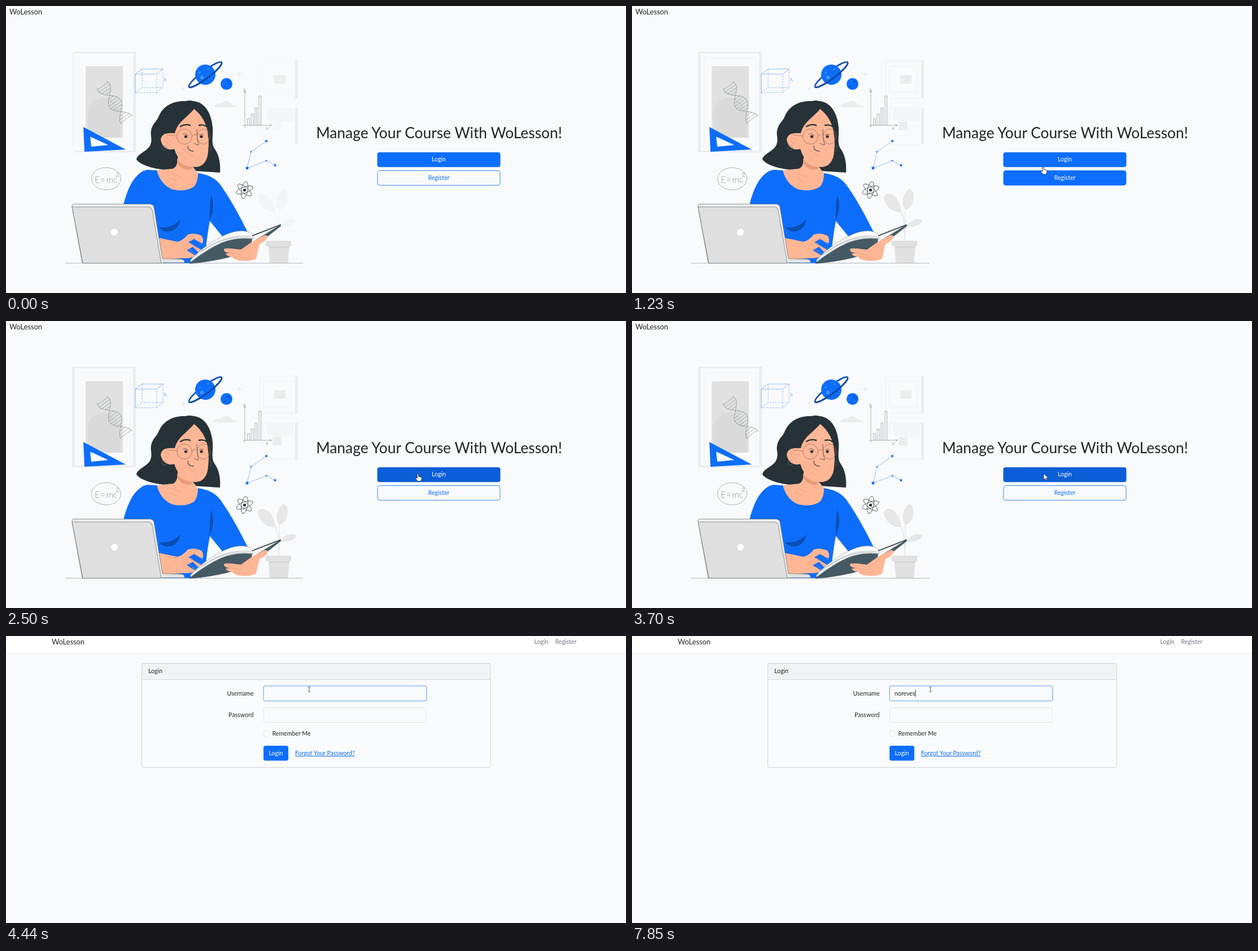
Animation, 1098 px wide and 510 px high, one loop 8000 ms. Source, as an HTML page:

```html
<!DOCTYPE html>
<html lang="en">
<head>
<meta charset="utf-8">
<title>WoLesson</title>
<style>
html, body { margin: 0; width: 100%; height: 100%; overflow: hidden; background: #f9fafc; }
svg { display: block; width: 100vw; height: 100vh; }
text { font: 10.6px Lato, sans-serif; fill: #212529; white-space: pre; }
.brand { font-size: 12.8px; }
.title { font-size: 26.35px; }
.mid { text-anchor: middle; }
.end { text-anchor: end; }
.white { fill: #fff; }
.nav { fill: #6f747a; }
.blue { fill: #0d6efd; }
.shade { fill: #0b4fb4; }
.skin { fill: #ffb695; }
.hair { fill: #263238; }
.grey { fill: #e1e1e1; }
.pale { fill: #eceded; }
.line { fill: none; stroke: #3c484e; stroke-width: .8; stroke-linecap: round; stroke-linejoin: round; }
.thin { stroke-width: .6; stroke: #7a8388; }
.rim { stroke-width: .7; stroke: #96685a; }
.sketch { fill: none; stroke: #6aa3f8; stroke-width: .7; }
.fold { fill: none; stroke: #e39a7c; stroke-width: .7; stroke-linecap: round; }
</style>
</head>
<body>
<svg viewBox="0 0 1098 510">
  <rect width="1098" height="510" fill="#f9fafc"/>

  <g id="home">
    <text class="brand" x="6" y="14.6">WoLesson</text>

    <!-- wall pictures -->
    <path class="pale" d="M121 81H230V84H121zM225 84H230V260H225zM122 257H225V260H122z"/>
    <path class="grey" d="M141 107H207V234H141z"/>
    <path fill="#dadada" d="M145 234V185Q150 164 176 163Q202 168 203 204V234z"/>
    <g class="late">
      <path class="pale" d="M117 81H122V260H117z"/>
      <path d="M128 92H220V249H128z" fill="none" stroke="#efefef"/>
      <path d="M450 98H512V164H450zM456 107H505V153H456zM455 181H512V246H455z" fill="none" stroke="#f1f1f1"/>
      <path class="pale" d="M472 206H488V221H472z"/>
    </g>
    <path class="pale" d="M512 97H517V164H512zM512 181H517V246H512zM475 123H495V138H475z"/>
    <path fill="#f4f5f6" d="M463 181H510V205H463z"/>
    <path class="pale" d="M368 178Q373 172 381 173Q387 166 396 171Q400 176 410 178Q411 180 390 180Q370 181 368 178z"/>
    <g id="sparkles" class="pale"></g>
    <path id="helix" class="line thin"/>

    <path class="blue" fill-rule="evenodd" d="M137 215L212 255L139 259zM149 232L151 250L181 247z"/>
    <path class="sketch" d="M229 154V121H267L278 112H241L229 121"/>
    <path class="sketch" stroke-dasharray="3 2" d="M229 154H267V121M241 112V145H278V112M229 154L241 145M267 154L278 145"/>
    <path class="sketch" d="M281 127V134M281 131Q284 128 284 134"/>

    <!-- planets -->
    <g transform="rotate(-37 353 122)">
      <ellipse cx="353" cy="122" rx="36" ry="7" fill="none" stroke="#0b4fb4" stroke-width="2.6"/>
      <circle class="blue" cx="353" cy="122" r="18"/>
      <path d="M317 122A36 7 0 0 0 389 122" fill="none" stroke="#0a479f" stroke-width="2.8"/>
    </g>
    <g fill="#4b93ff"><circle cx="347" cy="127" r="3.2"/><circle cx="343" cy="118" r="1.6"/><circle cx="358" cy="112" r="1.5"/></g>
    <circle class="blue" cx="390.5" cy="138.5" r="10.5"/>
    <g class="shade"><circle cx="394" cy="134" r="2"/><circle cx="397" cy="138" r="1.2"/><circle cx="387" cy="143" r="1.3"/></g>

    <!-- chart -->
    <path class="line thin" d="M423 216V151M421 154L423 150L425 154M420 212H470M467 210L470 212L467 214M420 147L422 149M424 147L421 151M461 216L464 220M464 216L461 220"/>
    <path class="line thin" d="M427.5 212V200H431V212M434 212V192H438V212M441 212V181H444.5V212M448 212V160H451.5V212"/>

    <!-- constellation -->
    <path class="sketch" d="M461 240L434 259L427 288L461 275L476.5 283"/>
    <g id="stars" class="blue"></g>

    <!-- atom -->
    <g id="atom" class="line"></g>
    <circle class="hair" cx="422.5" cy="327" r="2.6"/>

    <ellipse class="line thin" cx="177.5" cy="307" rx="26" ry="19.8"/>
    <path class="line thin" d="M165 303H159V314H165.5M159 308.5H164M168.5 307H174M168.5 310.5H174M179 314V307M179 309Q182 304 183.5 308V314M183.5 309Q187 304 188.5 308V314M195 307Q191 305 191 310Q191 315 196 313M195 298Q198 294 199 298Q199 300 195 303H200"/>

    <!-- plant -->
    <path class="grey" d="M460 417H505V427H502L499 457H467L465 427H460z"/>
    <path fill="#d6d6d6" d="M465 427H502L501.500 430H465.500z"/>
    <g class="late">
      <path fill="#e7e7e7" d="M477 366C465 369 448 357 446 341C447 330 462 332 469 343Q476 353 477 366zM484 362C475 350 481 333 490 325C500 325 501 342 496 352Q492 360 484 362zM485 391Q500 374 513 380Q516 386 502 391Q493 394 485 391z"/>
      <path d="M477 366Q484 380 483 417M484 362V400M485 391L483 410" fill="none" stroke="#dedede"/>
    </g>

    <!-- hair behind, shirt, neck -->
    <path class="hair" d="M318 169C297 168 279 177 271 195C266 207 262 206 258 217C254 230 260 234 256 246C252 258 231 263 231 273C241 286 276 293 302 291L379 296C380 281 378 265 369 253C363 244 367 232 366 216C364 193 354 171 332 169Q325 167 318 169z"/>
    <path class="blue" d="M250 291C231 297 219 312 208 353H258L278 457H338L354 430Q357 403 361 382L386 413L390 417L428 402Q405 355 384 324C374 308 362 300 339 297z"/>
    <path class="skin" d="M303 255Q307 284 296 289L267 292Q274 318 295 326Q318 331 333 321Q340 313 340 297L327 281z"/>
    <path fill="#e79b7b" d="M303 271Q310 284 330 286Q330 292 321 291Q308 289 303 277z"/>
    <path class="shade" d="M363 336Q369 347 366 365L361 382Q360 360 363 336zM271 393Q293 396 309 379Q306 395 293 400Q280 404 271 393z"/>
    <path d="M245 292Q236 297 232 306" fill="none" stroke="#0b4fb4" stroke-width=".7"/>

    <!-- face -->
    <path class="skin" d="M333 183C325 194 304 205 299 226C290 224 275 225 274 238C276 250 286 258 298 254Q303 272 317 280Q331 290 345 284Q357 277 358 258C360 238 361 205 333 183z"/>
    <path class="hair" d="M334 179C323 199 301 207 297 226Q290 225 282 227Q274 204 294 185Q312 170 334 179zM332 180C348 191 357 201 358 232L365 242V212C361 192 353 178 332 180z"/>
    <path class="fold" d="M279 235Q286 231 292 241M280 239Q285 243 291 246M304 260L322 273M313 254L335 270M295 298L309 304M291 305L302 311"/>
    <path d="M309 214Q317 209 326 212M342 212Q349 210 355 214" fill="none" stroke="#263238" stroke-width="2.4" stroke-linecap="round"/>
    <path class="line" d="M338 219Q338 235 341 247Q337 247 333 244"/>
    <path class="line" d="M322 249Q322 258 332 258" style="stroke-width:1.3"/>
    <g class="line rim"><circle cx="316" cy="232" r="13.5"/><ellipse cx="350" cy="232" rx="11.5" ry="13.5"/><path d="M329 231Q334 226 339 231M302 231L285 229"/></g>
    <circle class="hair" cx="318.5" cy="232" r="2.6"/><circle class="hair" cx="346" cy="232" r="2.6"/>
    <path class="line" d="M313 228Q319 225 323 230M342 229Q346 226 350 229"/>
    <g class="line thin"><circle cx="280.5" cy="252" r="4.2"/><path d="M360 248Q367 252 361 258"/></g>

    <!-- forearm -->
    <path class="skin" d="M270 412L304 419Q313 417 322 406Q333 402 346 408Q351 414 348 422L340 418Q348 427 348 435L340 442Q332 449 314 448L276 451z"/>
    <path class="blue" d="M323 420L333 414L348 423L347 434zM320 434L331 428L343 440L338 445z"/>
    <path class="fold" d="M320 419L334 412L347 424M312 428L327 421L345 437M311 435L322 430L338 443"/>

    <!-- book -->
    <path fill="#455a64" d="M324 457L381 417L437 407L486 388L487 391L436 431Q400 451 326 458z"/>
    <path d="M327 451Q350 427 376 413Q408 394 431 402Q438 406 437 414Q408 410 381 421Q353 434 327 455z" fill="#fcfcfc"/>
    <path d="M437 408L484 390L435 420z" fill="#f6f6f6"/>
    <path class="line thin" d="M327 451Q350 427 376 413Q408 394 431 402Q438 406 437 414Q408 410 381 421Q353 434 327 455M337 443Q387 402 434 410M347 436Q390 405 436 413"/>
    <path class="line" d="M437 408L486 389" style="stroke-width:1.7"/>
    <path class="skin" d="M463 408Q464 416 449 423Q446 434 443 449Q431 455 411 452Q399 448 402 446Q390 445 389 440L396 439Q383 437 387 431Q397 430 407 432L416 433L434 420L458 407z"/>
    <path class="fold" d="M395 438L415 442M403 446L421 447M418 437Q427 434 434 422"/>

    <!-- laptop and desk -->
    <path class="line thin" d="M105 457H526"/>
    <path d="M119 352H256Q261 353 262 357L277 449L311 450Q317 451 316 456H135L117 357Q116 353 119 352z" fill="#f0f0f0" stroke="#59656b" stroke-width=".7"/>
    <path d="M117 357H254Q258 358 259 363L275 457H136z" fill="#dfdfdf" stroke="#465258" stroke-width=".6"/>
    <path class="grey" d="M277 451L312 451Q317 453 315 456H278z"/>
    <circle cx="192" cy="402" r="6" class="white"/>

    <text class="title mid" x="767" y="234.7">Manage Your Course With WoLesson!</text>
    <rect id="loginButton" x="657.5" y="260" width="218" height="26.3" rx="4"/>
    <text class="white mid" x="766.5" y="276.3">Login</text>
    <rect id="registerButton" x="658" y="292.5" width="217" height="26" rx="4" fill="#0d6efd" stroke="#0d6efd" stroke-width=".8"/>
    <text id="registerText" class="mid" x="766.5" y="308.6">Register</text>
  </g>

  <g id="login">
    <rect y="30" width="1098" height="2" fill="#eef0f2"/>
    <rect width="1098" height="30.3" fill="#fff"/>
    <text class="brand" x="81" y="14.6">WoLesson</text>
    <text class="nav" x="935.5" y="14.2">Login</text>
    <text class="nav" x="972.5" y="14.2">Register</text>
    <rect x="240.5" y="48.5" width="617.5" height="185" rx="3" fill="#fafbfd"/>
    <path d="M240.5 77V51Q241 48.5 243 48.5H855Q858 49 858 51V77z" fill="#f2f3f5"/>
    <path d="M240.5 77.5H858" stroke="#d5d8dc"/>
    <rect x="240.5" y="48.5" width="617.5" height="185" rx="3" fill="none" stroke="#cfd3d8"/>
    <text x="252" y="66.2">Login</text>
    <text class="end" x="438.5" y="105.6">Username</text>
    <text class="end" x="438.5" y="144.3">Password</text>
    <rect x="455" y="87.5" width="291" height="29" rx="4" fill="#c0d9fd"/>
    <rect x="456.5" y="89" width="288" height="26" rx="2.5" fill="#fafbfd" stroke="#8ab8fb"/>
    <rect x="456.5" y="127.5" width="287.5" height="26" rx="3" fill="#fafbfd" stroke="#e3e6eb"/>
    <rect x="456.5" y="169" width="9" height="9.5" rx="2" fill="#fbfcfd" stroke="#e6e9ed"/>
    <text x="471.5" y="177.3">Remember Me</text>
    <rect class="blue" x="456" y="195" width="44" height="26.5" rx="3.5"/>
    <text class="white mid" x="478" y="212">Login</text>
    <text class="blue" x="512" y="212" text-decoration="underline">Forgot Your Password?</text>
    <text id="typed" x="465" y="105.5"></text>
    <path id="caret" d="M.5 95.5V108.5" stroke="#212529" stroke-width=".9"/>
  </g>

  <g id="arrow"><path d="M0 0V11L2.6 8.6L4.3 12.3L6 11.5L4.4 8H8z" fill="#fff" stroke="#222" stroke-width=".7"/></g>
  <g id="hand"><path d="M-1.2 1Q0-.8 1.2 1V5Q2.5 4 3.3 5.3Q4.6 4.6 5.3 5.8Q7 5.4 7 7.2Q7 10.5 5.3 13H-.8Q-2 10.5-4 8.3Q-4.3 6.3-2.4 7L-1.2 8.3z" fill="#fff" stroke="#222" stroke-width=".8"/></g>
  <g id="beam"><path d="M-2-4.5Q0-4.5 0-3.5Q0-4.5 2-4.5M0-4V4M-2 4.5Q0 4.5 0 3.5Q0 4.5 2 4.5" fill="none" stroke="#333" stroke-width=".8"/></g>
</svg>

<script>
const LOOP = 8000, PAGE_CHANGE = 3770;
const $ = id => document.getElementById(id);
const clamp = v => Math.max(0, Math.min(1, v));
const ramp = (t, start, length = 150) => {
  const p = clamp((t - start) / length);
  return p * p * (3 - 2 * p);
};
const mix = (a, b, p) => `rgb(${a.map((v, i) => v + (b[i] - v) * p)})`;
const show = (el, on) => { el.style.display = on ? '' : 'none'; };

const starPath = (x, y, outer, inner, points) => {
  const corners = Array.from({ length: points * 2 }, (_, i) => {
    const r = i % 2 ? inner : outer, a = Math.PI * (i / points - .5);
    return (x + r * Math.cos(a)).toFixed(2) + ' ' + (y + r * Math.sin(a)).toFixed(2);
  });
  return `<path d="M${corners.join('L')}z"/>`;
};
$('stars').innerHTML = [[461, 240, 3], [434, 259, 2], [427, 288, 3.8], [461, 275, 2], [476.5, 283, 3]]
  .map(([x, y, r]) => starPath(x, y, r, r * .5, 5)).join('');
$('sparkles').innerHTML = [[413, 121, 6], [314, 147, 5], [362, 89, 2], [401, 121, 2]]
  .map(([x, y, r]) => starPath(x, y, r, r * .28, 4)).join('');
$('atom').innerHTML = [-20, 40, 100]
  .map(a => `<ellipse cx="422.5" cy="327" rx="15.5" ry="5.5" transform="rotate(${a} 422.5 327)"/>`).join('');

// two strands winding round a slanted axis, joined by rungs
const strand = (s, side) => {
  const offset = side * 12 * Math.cos(Math.PI * (2.2 * s - .16));
  return `${170 + 44 * s + offset * .81} ${140 + 63 * s - offset * .585}`;
};
const steps = Array.from({ length: 31 }, (_, i) => i / 30);
$('helix').setAttribute('d',
  [1, -1].map(side => 'M' + steps.map(s => strand(s, side)).join('L')).join('') +
  steps.filter((_, i) => i % 2).map(s => `M${strand(s, 1)}L${strand(s, -1)}`).join(''));

// time, x, y of the pointer tip
const pointer = [
  [480, 977, 486], [560, 912, 463], [690, 788, 422], [760, 767, 387], [910, 726, 318],
  [950, 723.5, 303], [1230, 728, 286], [1420, 729.5, 272], [4040, 729, 271],
  [4440, 537, 95], [4720, 537, 95], [4780, 528.5, 95]
];
function pointerAt(t) {
  const next = pointer.findIndex(k => k[0] > t);
  if (next < 0) return pointer.at(-1).slice(1);
  if (!next) return pointer[0].slice(1);
  const a = pointer[next - 1], b = pointer[next], p = (t - a[0]) / (b[0] - a[0]);
  return [a[1] + (b[1] - a[1]) * p, a[2] + (b[2] - a[2]) * p];
}

const userName = 'noreves';
const keyTimes = [6130, 6330, 7060, 7260, 7390, 7720, 7850];
const caretResets = [4780, ...keyTimes];
const late = document.querySelectorAll('.late');

function draw(t) {
  const onLogin = t >= PAGE_CHANGE;
  show($('home'), !onLogin);
  show($('login'), onLogin);

  late.forEach(g => { g.style.opacity = .3 + .7 * ramp(t, 480, 450); });
  const hover = ramp(t, 921) * (1 - ramp(t, 1230));
  $('registerButton').style.fillOpacity = hover;
  $('registerText').style.fill = mix([13, 110, 253], [255, 255, 255], hover);
  const pressed = ramp(t, 2230, 100) - ramp(t, 2400, 100);
  $('loginButton').style.fill = mix([13, 110, 253], [11, 94, 215], ramp(t, 1270) + pressed * .4);

  $('typed').textContent = userName.slice(0, keyTimes.filter(k => t >= k).length);
  const reset = caretResets.findLast(k => t >= k);
  show($('caret'), reset && (t - reset) % 1060 < 530);
  if (onLogin) $('caret').setAttribute('transform', `translate(${465 + $('typed').getComputedTextLength()})`);

  const [x, y] = pointerAt(t);
  const inField = onLogin && y < 116 && x < 745;
  const shape = t < 480 ? '' : inField ? 'beam' : t >= 910 && t < 3700 ? 'hand' : 'arrow';
  for (const id of ['arrow', 'hand', 'beam']) {
    show($(id), id === shape);
    $(id).setAttribute('transform', `translate(${x} ${y})`);
  }
}

const start = performance.now();
function tick() {
  draw((performance.now() - start) % LOOP);
  requestAnimationFrame(tick);
}
tick();
</script>
</body>
</html>
```
